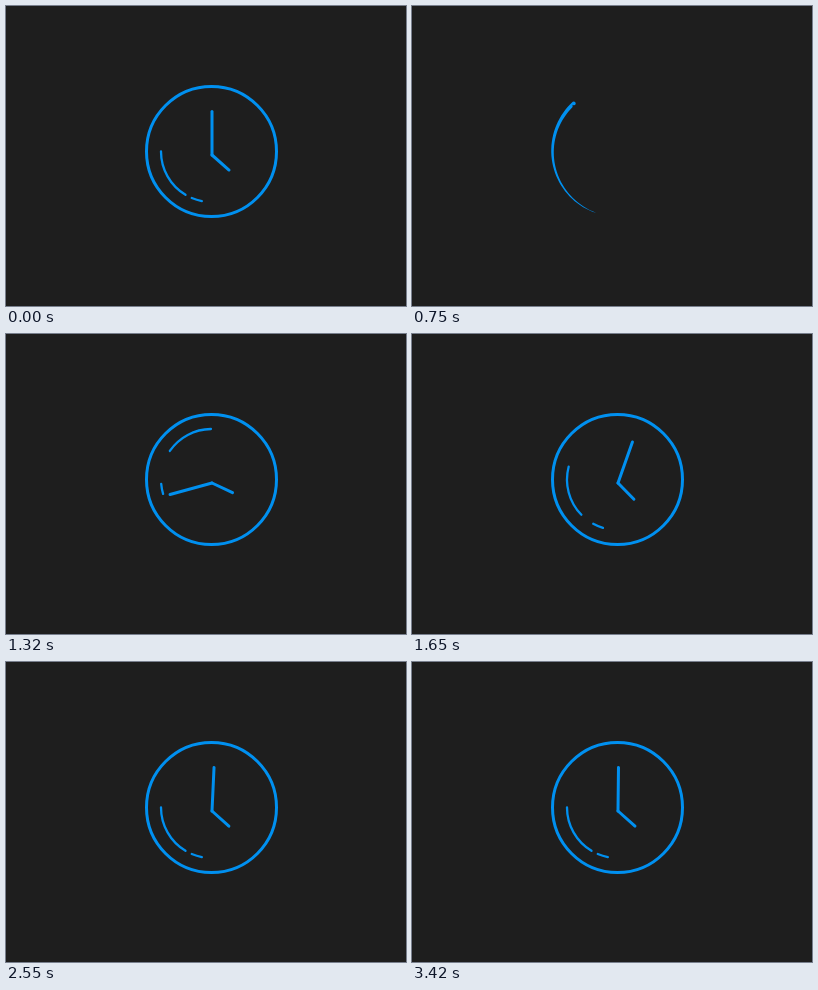
Recreate the animation shown at these times as an HTML page with a canvas. Size 400 px wide and 300 px high, loop 3450 ms.

```html
<!DOCTYPE html>
<html lang="en">
<head>
<meta charset="utf-8">
<title>Clock</title>
<style>
  html, body { margin: 0; width: 100%; height: 100%; overflow: hidden; background: #1e1e1e; }
  canvas { display: block; width: 400px; height: 300px; }
</style>
</head>
<body>
<canvas id="stage"></canvas>
<script>
const LOOP = 3450;
const BLUE = '#0090f0';
const CX = 205.5, CY = 145.5, R = 65;
const PIVOT_X = 206, PIVOT_Y = 149;
const HOUR = 131.4;

const canvas = document.getElementById('stage');
const ctx = canvas.getContext('2d');
const dpr = window.devicePixelRatio || 1;
canvas.width = 400 * dpr;
canvas.height = 300 * dpr;

const progress = (t, from, to) => Math.min(1, Math.max(0, (t - from) / (to - from)));
const easeOut = (x, p) => 1 - (1 - x) ** p;
// Degrees run clockwise from twelve o'clock.
const rad = deg => (deg - 90) * Math.PI / 180;

// cubic-bezier(.33, 0, .2, 1)
function glide(x) {
  let lo = 0, hi = 1;
  for (let i = 0; i < 24; i++) {
    const s = (lo + hi) / 2, q = 1 - s;
    if (0.99 * s * q * q + 0.6 * s * s * q + s ** 3 < x) lo = s; else hi = s;
  }
  return lo * lo * (3 - 2 * lo);
}

// Damped swing around rest, ms after arrival.
function swing(ms, amp) {
  const s = ms / 1000;
  return amp * Math.exp(-2.2 * s) * Math.sin(2 * Math.PI * s / 0.45);
}

function arc(r, from, to, width) {
  ctx.lineWidth = width;
  ctx.beginPath();
  ctx.arc(CX, CY, r, rad(from), rad(to));
  ctx.stroke();
}

function dot(x, y, r) {
  ctx.beginPath();
  ctx.arc(x, y, r, 0, 2 * Math.PI);
  ctx.fill();
}

function hand(angle, length) {
  const a = rad(angle);
  ctx.lineWidth = 3;
  ctx.beginPath();
  ctx.moveTo(PIVOT_X, PIVOT_Y);
  ctx.lineTo(PIVOT_X + length * Math.cos(a), PIVOT_Y + length * Math.sin(a));
  ctx.stroke();
}

function glint(mid, span) {
  arc(50.5, mid - span / 2, mid + span / 2, 2.3);
}

// Crescent that thickens from tail to head.
function comet(tail, head) {
  const steps = 40, half = 1.9;
  ctx.beginPath();
  for (let i = 0; i <= 2 * steps; i++) {
    const outer = i <= steps;
    const u = (outer ? i : 2 * steps - i) / steps;
    const r = R + (outer ? 1 : -1) * half * u ** 0.8;
    const a = rad(tail + (head - tail) * u);
    ctx.lineTo(CX + r * Math.cos(a), CY + r * Math.sin(a));
  }
  ctx.fill();
  dot(CX + R * Math.cos(rad(head)), CY + R * Math.sin(rad(head)), half);
}

function ripple(x) {
  ctx.lineWidth = 4 * (1 - x);
  ctx.beginPath();
  ctx.arc(CX - 0.5, CY - R, 17.3 * easeOut(x, 2), 0, 2 * Math.PI);
  ctx.stroke();
}

function restingClock() {
  arc(R, 0, 360, 3);
  glint(240.5, 59);
  glint(197, 12);
  hand(0, 43.5);
  hand(HOUR, 22.7);
}

function movingGlint(t, start, time, turn, mid, span) {
  if (t < start) return;
  const left = turn * (1 - glide(progress(t, start, start + time)));
  glint(mid + left, span * glide(progress(t, start, start + 500)));
}

function hands(t) {
  if (t < 980) return;
  const size = easeOut(progress(t, 980, 1330), 3);
  const minute = t < 1462 ? 360 * progress(t, 980, 1462) : swing(t - 1462, 61);
  const hour = t < 1237 ? 87 * (1 - progress(t, 980, 1237)) : -swing(t - 1237, 21);
  hand(minute, 43.5 * size);
  hand(HOUR + hour, 22.7 * size);
}

function draw(t) {
  ctx.setTransform(dpr, 0, 0, dpr, 0, 0);
  ctx.fillStyle = '#1e1e1e';
  ctx.fillRect(0, 0, 400, 300);
  ctx.fillStyle = ctx.strokeStyle = BLUE;
  ctx.lineCap = ctx.lineJoin = 'round';

  if (t < 30) return restingClock();

  if (t > 30 && t < 860) {
    comet(360 * progress(t, 30, 860) ** 4.3, 360 * progress(t, 30, 800) ** 1.9);
  }
  if (t > 800) {
    arc(R, 0, 360 * easeOut(progress(t, 800, 1300), 1.295), 3);
    if (t < 1065) ripple(progress(t, 800, 1065));
  }
  movingGlint(t, 980, 1000, 198, 240.5, 59);
  movingGlint(t, 950, 900, 190, 197, 12);

  if (t > 900 && t < 1160) {
    const r = t < 980 ? 4.5 * progress(t, 900, 980) : 4.5 - 3 * progress(t, 980, 1160);
    dot(PIVOT_X - 1, PIVOT_Y - 0.5, r);
  }
  hands(t);
}

const start = performance.now();
function tick() {
  draw((performance.now() - start) % LOOP);
  requestAnimationFrame(tick);
}
tick();
</script>
</body>
</html>
```
